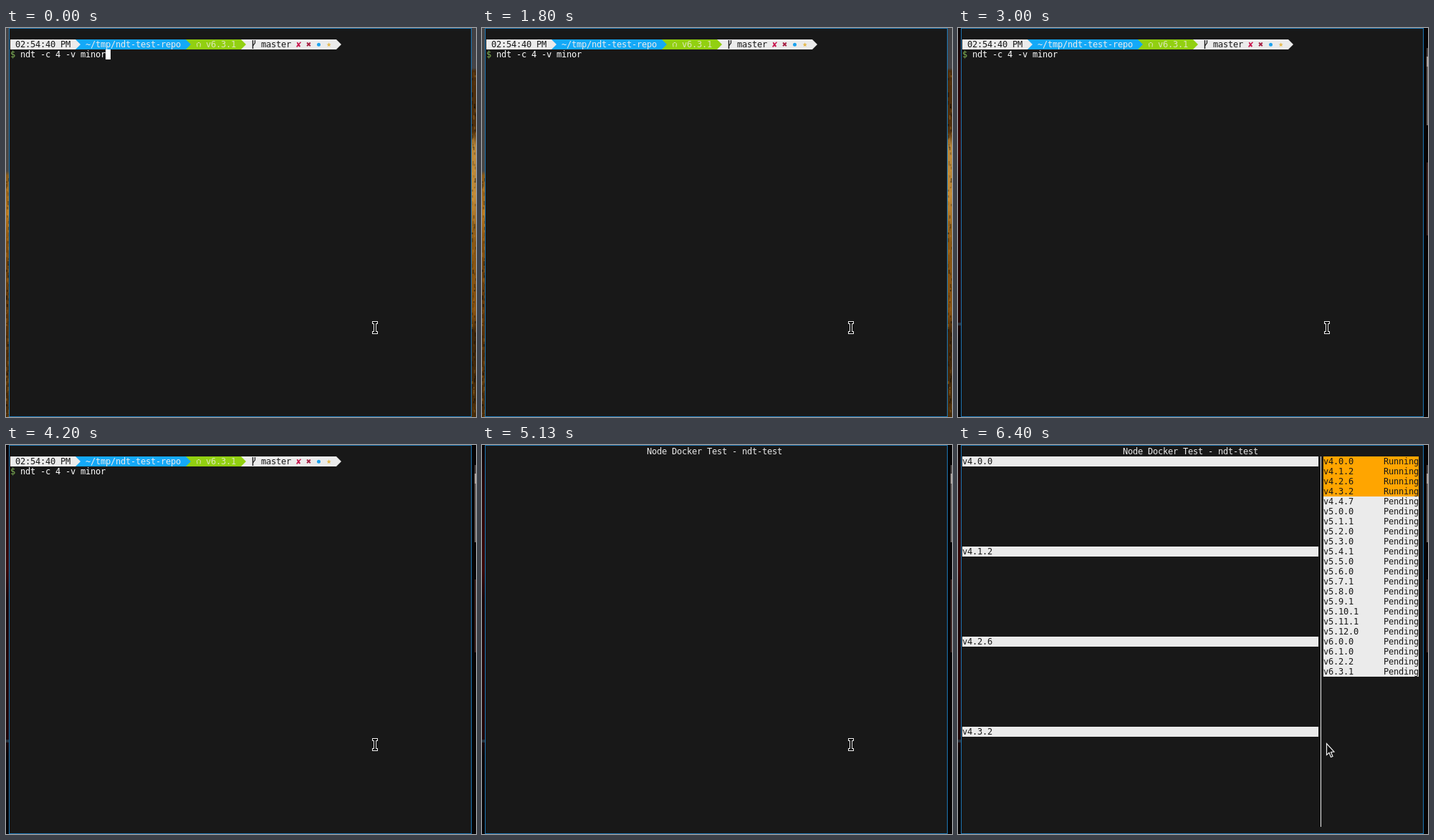
Write an HTML page with a canvas that moves like this. It is 656 by 544 pixels and loops after 8000 ms.

```html
<!DOCTYPE html>
<html lang="en">
<head>
<meta charset="utf-8">
<title>Terminal session</title>
<style>
  html, body { margin: 0; width: 100%; height: 100%; overflow: hidden; background: #181818; }
  canvas { display: block; }
</style>
</head>
<body>
<canvas id="stage" width="656" height="544"></canvas>
<script>
const ctx = document.getElementById('stage').getContext('2d');
const LOOP = 8000, CELL_W = 7, CELL_H = 14;
const DARK = '#181818', LIGHT = '#ebebeb', BLUE = '#14a9f8', GREEN = '#92d011', ORANGE = '#ffa500';
const VERSIONS = ('4.0.0 4.1.2 4.2.6 4.3.2 4.4.7 5.0.0 5.1.1 5.2.0 5.3.0 5.4.1 5.5.0 5.6.0 5.7.1 ' +
  '5.8.0 5.9.1 5.10.1 5.11.1 5.12.0 6.0.0 6.1.0 6.2.2 6.3.1').split(' ').map(v => 'v' + v);
const ACTIVE = 4;

const colX = col => 6 + col * CELL_W;
const rowY = row => 2 + row * CELL_H;

function box(color, x, y, w, h) {
  ctx.fillStyle = color;
  ctx.fillRect(x, y, w, h);
}

function cells(color, col, row, count) {
  box(color, colX(col), rowY(row), count * CELL_W, CELL_H);
}

// Every character sits in its own terminal cell.
function print(text, col, row, color) {
  ctx.fillStyle = color;
  [...text].forEach((ch, i) => ctx.fillText(ch, colX(col + i), rowY(row) + 11));
}

function path(points, { fill, stroke, width = 1, closed = true }) {
  ctx.beginPath();
  points.forEach(([x, y]) => ctx.lineTo(x, y));
  if (closed) ctx.closePath();
  if (fill) { ctx.fillStyle = fill; ctx.fill(); }
  if (stroke) { ctx.strokeStyle = stroke; ctx.lineWidth = width; ctx.stroke(); }
}

function random(seed) {
  return () => (seed = seed * 16807 % 2147483647) / 2147483647;
}

function strip(x, w, stops, seed, speckle) {
  const gradient = ctx.createLinearGradient(0, 0, 0, 544);
  stops.forEach(([y, color]) => gradient.addColorStop(y / 544, color));
  box(gradient, x, 0, w, 544);
  const next = random(seed);
  for (let y = speckle; y < 544; y += 4) {
    const shade = next();
    const tone = shade < 0.6 ? `rgba(0,0,0,${shade * 0.7})` : `rgba(235,165,60,${(shade - 0.6) * 0.6})`;
    box(tone, x + Math.floor(next() * w), y, 2, 2 + next() * 5);
  }
}

function autumnWallpaper() {
  strip(0, 4, [[0, '#454547'], [200, '#4a4846'], [206, '#8a5a18'], [260, '#b87820'],
    [300, '#85500e'], [400, '#5c3408'], [544, '#4a2c08']], 71, 206);
  strip(650, 6, [[0, '#404044'], [56, '#444448'], [60, '#4a2c0c'], [145, '#50300c'], [165, '#b8883c'],
    [235, '#c08a38'], [300, '#8a5814'], [400, '#855010'], [425, '#3c2408'], [544, '#4a2e0a']], 913, 58);
}

function nightWallpaper() {
  box('#050304', 0, 0, 656, 544);
  const gradient = ctx.createLinearGradient(0, 0, 0, 544);
  [[0, '#080304'], [0.1, '#250606'], [0.32, '#3a0808'], [0.4, '#180406'], [0.55, '#220506'],
    [0.75, '#200506'], [0.8, '#080406'], [1, '#050304']].forEach(s => gradient.addColorStop(...s));
  box(gradient, 0, 0, 4, 544);
  box('#28303a', 0, 412, 4, 4);
  box('#4a4444', 654, 28, 2, 12);
  box('#a8a09c', 654, 40, 2, 14);
  box('#686260', 654, 54, 2, 82);
  box('#3a2422', 654, 188, 2, 102);
}

function wallpaper(t) {
  const fade = t < 2330 ? 0 : t < 2400 ? 1 / 3 : t < 2530 ? 2 / 3 : 1;
  if (fade < 1) autumnWallpaper();
  ctx.globalAlpha = fade;
  if (fade) nightWallpaper();
  ctx.globalAlpha = 1;
}

function segment(col, count, color, nextColor) {
  cells(color, col, 1, count);
  if (nextColor) cells(nextColor, col + count, 1, 1);
  const x = colX(col + count), y = rowY(1);
  path([[x, y], [x + CELL_W, y + 7], [x, y + CELL_H]], { fill: color });
}

function prompt() {
  segment(0, 13, LIGHT, BLUE);
  segment(14, 21, BLUE, GREEN);
  segment(36, 10, GREEN, LIGHT);
  segment(47, 18, LIGHT);
  print('02:54:40 PM', 1, 1, DARK);
  print('~/tmp/ndt-test-repo', 15, 1, LIGHT);
  print('v6.3.1', 39, 1, '#dce6b8');
  print('master', 50, 1, DARK);
  print('✘', 57, 1, '#c9124c');
  print('✖', 59, 1, '#a51f42');

  path([[267, 26.5], [266.5, 22], [268, 20.5], [270, 20.5], [271.5, 22], [271, 26.5]],
    { stroke: '#dce6b8', closed: false });
  path([[344.5, 17], [344.5, 29]], { stroke: DARK, width: 1.4, closed: false });
  path([[347.5, 17], [347.5, 21], [344.5, 25]], { stroke: DARK, width: 1.2, closed: false });
  ctx.beginPath();
  ctx.arc(436.5, 23.3, 2.5, 0, 7);
  ctx.fillStyle = '#1ba2ef';
  ctx.fill();
  const star = Array.from({ length: 10 }, (_, i) => {
    const a = i * Math.PI / 5 - Math.PI / 2, r = i % 2 ? 1.5 : 3.2;
    return [450.7 + r * Math.cos(a), 23.4 + r * Math.sin(a)];
  });
  path(star, { fill: '#e5b94d' });

  print('$', 0, 2, '#82b555');
  print('ndt -c 4 -v minor', 2, 2, '#fff');
}

function cursor(t) {
  if (t >= 4800) cells('#fff', 0, 3, 1);
  else if (t >= 4730 || Math.floor(t / 600) % 2 === 0) cells('#fff', 19, 2, 1);
}

function dashboard() {
  VERSIONS.forEach((version, i) => {
    const running = i < ACTIVE;
    cells(running ? ORANGE : LIGHT, 72, i + 1, 19);
    print(version, 72, i + 1, DARK);
    print(running ? 'Running' : 'Pending', 84, i + 1, DARK);
    if (running) {
      cells(LIGHT, 0, 1 + i * 9, 71);
      print(version, 0, 1 + i * 9, DARK);
    }
  });
  box(LIGHT, 506, 16, 1, 518);
}

function textPointer() {
  const bars = [[511, 410, 8, 4], [511, 424, 8, 4], [513, 411, 4, 16]];
  bars.forEach(b => box('#f2f2f2', ...b));
  bars.forEach(([x, y, w, h]) => box('#000', x + 1, y + 1, w - 2, h - 2));
}

function arrowPointer() {
  path([[514.5, 417.5], [514.5, 433.5], [518, 430.3], [520.5, 436.5], [523, 435.5],
    [520.5, 429.5], [525, 429]], { fill: '#101010', stroke: '#f2f2f2', width: 1.2 });
}

function draw(now) {
  const t = now % LOOP;
  wallpaper(t);
  box(DARK, 4, 0, 646, 544);
  ctx.strokeStyle = '#1d77b4';
  ctx.lineWidth = 1;
  ctx.strokeRect(4.5, 0.5, 645, 543);
  ctx.font = '12px "DejaVu Sans Mono", monospace';

  if (t < 5000) {
    prompt();
    cursor(t);
  }
  if (t >= 5130) print('Node Docker Test - ndt-test', 32, 0, LIGHT);
  if (t >= 5530) {
    dashboard();
    arrowPointer();
  } else {
    textPointer();
  }
  requestAnimationFrame(draw);
}
requestAnimationFrame(draw);
</script>
</body>
</html>
```
